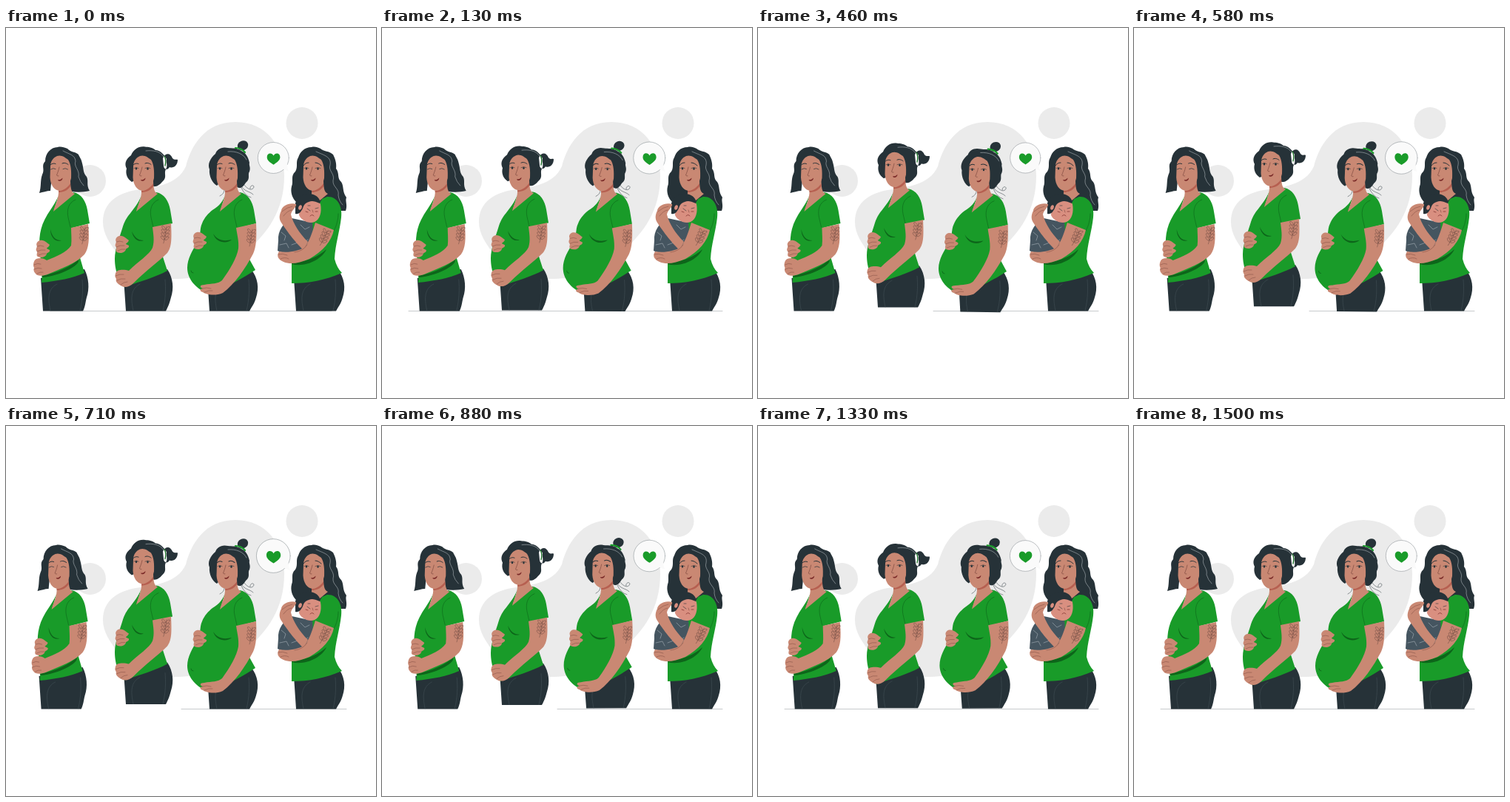
An HTML page with a canvas for the animation above (1.54 s loop, 500 by 500 pixels).

```html
<!DOCTYPE html>
<html lang="en">
<head>
<meta charset="utf-8">
<title>Four stages</title>
<style>
html, body { margin: 0; width: 100%; height: 100%; overflow: hidden; background: #fff; }
canvas { display: block; width: 100vw; height: 100vh; }
</style>
</head>
<body>
<canvas id="stage" width="500" height="500"></canvas>
<script>
const ctx = document.getElementById('stage').getContext('2d');
const LOOP = 1540;
const GREEN = '#199b29', SHADE = '#0d651a', DARK = '#263238', SKIN = '#c98873',
  BABY_SKIN = '#d98f80', LINE = '#7f4a40', LIP = '#7a2a28', GREY = '#ebebeb',
  SEAM = '#46545b', SHINE = '#c9cfd2', WRAP = '#455560';

function fill(color, d) {
  ctx.fillStyle = color;
  ctx.fill(new Path2D(d));
}
function line(color, width, d) {
  ctx.strokeStyle = color;
  ctx.lineWidth = width;
  ctx.stroke(new Path2D(d));
}
function oval(color, x, y, rx, ry = rx, turn = 0) {
  ctx.fillStyle = color;
  ctx.beginPath();
  ctx.ellipse(x, y, rx, ry, turn, 0, Math.PI * 2);
  ctx.fill();
}
function at(x, y, angle, draw) {
  ctx.save();
  ctx.translate(x, y);
  ctx.rotate(angle);
  draw();
  ctx.restore();
}

// Smooth curve through [time, value] keys, at rest at both ends.
function track(...keys) {
  const slope = i => {
    const a = keys[i - 1], b = keys[i + 1];
    return a && b ? (b[1] - a[1]) / (b[0] - a[0]) : 0;
  };
  return t => {
    let i = 0;
    while (i < keys.length - 2 && t > keys[i + 1][0]) i++;
    const [t0, v0] = keys[i], [t1, v1] = keys[i + 1];
    const d = t1 - t0, u = (t - t0) / d, w = 1 - u;
    return v0 * (1 + 2 * u) * w * w + v1 * u * u * (3 - 2 * u)
      + d * u * w * (slope(i) * w - slope(i + 1) * u);
  };
}
const sway = track([0, 0], [180, 1], [290, 0.9], [460, -1.5], [660, -2.5], [1080, -0.9], [1330, -0.3], [1500, 0], [1540, 0]);
const lift = track([0, 0], [290, -2.8], [460, -4.8], [680, -6.5], [1080, -3.6], [1330, -1.2], [1500, 0], [1540, 0]);
const tilt = track([0, 0], [290, 0.011], [460, 0.011], [710, 0], [1080, -0.013], [1330, -0.005], [1500, 0], [1540, 0]);
const beat = track([0, 1], [270, 1.05], [460, 0.98], [700, 1.09], [930, 1], [1540, 1]);

function tattoo(x, y, angle) {
  at(x, y, angle, () => {
    line('#6d4a42', 0.5, 'M-1 12C1 5 0 -4 1 -11');
    for (let i = 0; i < 4; i++) {
      for (const side of [-1, 1]) {
        ctx.beginPath();
        ctx.ellipse(side * 2.9, 5 - i * 4.6, 3.2, 1.5, side * -0.75, 0, Math.PI * 2);
        ctx.stroke();
      }
    }
  });
}

function pants(right) {
  fill(DARK, `M47 338L106 326C${right + 1} 338 ${right + 2} 352 ${right - 2} 364C${right - 4} 372 107 377 104 382.4L50 382.4Z`);
  line(SEAM, 0.5, 'M60 382C56 364 57 352 69 346M100 382C104 366 104 352 103 340');
}

function head({ closed = false, worried = false } = {}) {
  fill(SKIN, 'M70 210L87 203C87 216 88 222 93 224L64 248C66 239 72 230 71 218Z');
  fill('#b65f50', 'M71 219C79 219 84 215 87 210L87 214C83 220 77 222 71 222Z');
  fill(SKIN, 'M60 187C60 180 64 175 69 173C75 171 80 175 84 178C88 184 88.5 194 88 203C86 213 79 220 72 220C65 219 60 212 59.5 202Z');
  line(DARK, 1, worried
    ? 'M60 186C62 183 64 182 67 182M76 182C79 182 82 184 84 186'
    : 'M60 185C62 183 65 182.5 67 183.5M76 183C79 181.5 82 183 84 184.5');
  if (closed) {
    line(DARK, 0.7, 'M60.5 191Q64 188.5 67 190.5M77 190.5Q80 188.5 83.5 191');
  } else {
    oval(DARK, 64, 190, 1.2, 1.6);
    oval(DARK, 79.5, 190.2, 1.2, 1.6);
    line(DARK, 0.6, 'M61 189.5Q64 187.2 67 189.5M76 189.5Q79.5 187.2 83 189.5');
  }
  line(LINE, 0.7, 'M72 188C71 193 69.5 196 68.5 199Q70 200.5 71 200');
  fill(LIP, 'M70 205C73 205.5 74.5 204.5 76.5 202.5C76.5 205.5 74 207.5 71 206.5Z');
}

function shirt(front) {
  fill(GREEN, `M71 226L65 246L91 222C102 224 108 234 110 246L113 264L90 270L97 300${front}C64 240 68 234 71 226Z`);
  line(SHADE, 0.6, 'M94 232C84 236 82 246 84 256L87 269M65 246L84 230');
}

// Resting hand with the fingers pointing left.
function hand(x, y) {
  at(x, y, 0, () => {
    fill(SKIN, 'M5 0C11 -1 15 4 18 6C17 9 14 10 14 11L18 13C19 16 14 17 14 18C13 23 6 24 2 22C-1 20 2 16 1 15C-2 13 1 9 1 8C-1 5 1 1 5 0Z');
    line(LINE, 0.5, 'M1 8Q6 6 10 8M1 15Q6 12 12 13M3 20Q8 17 13 18');
  });
}

function firstWoman() {
  fill(DARK, 'M70 161C60 161 53 170 53 180C47 186 53 191 49 198C46 206 48 214 45 223C50 222 55 220 60 220L62 200L84 212L88 221C96 222 104 222 113 220C108 212 112 207 109 201C104 196 105 190 103 183C102 177 99 174 98 171C94 167 87 168 83 163C78 161 74 160 70 161Z');
  line(SHINE, 0.5, 'M77 166C86 171 93 171 94 180C91 187 100 192 98 201Q100 208 105 213');
  pants(111);
  shirt('L106 331C90 338 70 342 48 344C50 330 47 318 46 305C44 285 45 270 56 252');
  head({ closed: true });
  fill(SHADE, 'M60 272C62 281 66 287 75 287C68 290 60 284 60 272ZM48 335C70 331 89 321 98 313C101 321 72 335 50 337Z');
  hand(41, 287);
  fill(SKIN, 'M88 270L111 265C113 285 112 298 106 306C95 318 75 325 56 333C48 336 42 335 40 332C36 328 38 325 38 324C36 321 37 314 41 312C46 310 51 311 55 314C68 309 82 303 88 294C89 286 88 278 88 270Z');
  line(LINE, 0.5, 'M38 320Q43 317 47 319M38 326Q43 323 48 325M42 332Q46 329 50 330');
  tattoo(105, 280, 0.1);
}

function secondWoman() {
  fill(DARK, 'M100 176C104 168 110 169 113 176C116 179 118 177 120 178C120 186 114 190 109 188C106 193 101 191 101 186ZM76 160.5C68 159 60 164 57 172C49 178 48 184 51 190C49 197 52 204 58 208L64 205L86 214C94 215 97 210 100 207C106 202 101 196 104 191C107 186 104 182 105 177C101 170 96 165 90 165C86 161 80 161 76 160.5Z');
  line(SHINE, 0.5, 'M77 166C86 165 96 166 101 174');
  line(SHADE, 1.3, 'M102 173Q105 178 103 186');
  pants(113);
  shirt('L106 328C90 337 70 342 48 350C42 345 35 330 35 312C35 298 42 282 46 268C49 259 53 254 57 249');
  head();
  fill(SHADE, 'M58 275C62 283 66 287 74 287C67 290 60 285 58 275Z');
  hand(36, 281);
  fill(SKIN, 'M86 269L111 264C112 285 112 296 106 304C94 316 78 327 60 345C54 351 47 351 43 348C37 345 36 341 37 339C34 335 36 329 39 328C44 326 50 327 54 328C66 316 82 306 86 297C89 288 87 278 86 269Z');
  line(LINE, 0.5, 'M36 335Q42 332 47 333M38 341Q43 338 49 339M43 347Q47 343 52 343');
  tattoo(103, 279, 0.1);
}

function thirdWoman() {
  oval(DARK, 95, 158.8, 7.4, 6.4, -0.4);
  fill(DARK, 'M75 162C66 160 60 164 58 170C51 176 47 184 50 191C49 200 54 210 60 213L65 208L86 214C92 219 96 214 99 209C106 204 101 198 104 194C106 188 103 186 104 182C102 173 98 168 93 166C86 161 80 163 75 162Z');
  line(SHINE, 0.5, 'M75 167C86 166 96 170 100 178');
  line(GREEN, 2.2, 'M85 162Q93 162 98 168');
  line(DARK, 0.5, 'M92 212C97 222 104 220 109 225M96 211C102 219 108 220 110 215C110 211 104 213 105 217M93 216Q98 227 106 229M70 219Q70 224 64 227');
  pants(115);
  shirt('L112 327C95 338 70 353 46 358C30 351 20 338 20 324C20 312 27 300 33 291C39 282 36 272 40 264C43 256 49 250 54 246');
  head();
  fill(SHADE, 'M55 278C60 286 68 289 80 286C74 292 59 291 55 278Z');
  line(SHADE, 0.8, 'M25 328Q25 331 28 331');
  hand(28, 276);
  fill(SKIN, 'M86 270L113 264C114 285 113 296 109 305C98 326 84 346 68 358C59 362 46 361 41 357C37 356 36 353 41 352C36 350 37 347 43 347C53 345 62 346 67 341C78 326 87 310 89 298C90 288 87 278 86 270Z');
  line(LINE, 0.5, 'M40 352Q46 350 52 352M43 357Q49 354 54 355');
  tattoo(106, 283, 0.08);
}

function baby() {
  fill(WRAP, 'M386 257C375 263 367 274 368 287L367 301C376 306 396 303 405 298C414 291 416 276 414 263Z');
  line('#a8b3b9', 0.6, 'M372 276L378 281L376 287M382 270L388 276M370 293L379 291L382 297M389 282L396 279L400 284M386 293L394 290M398 266L404 272L410 269M401 291L408 286');
  fill(BABY_SKIN, 'M397 236C405 231 422 232 425 238C427 249 424 259 417 262C409 265 399 260 396 253Z');
  fill(DARK, 'M391 243C389 231 400 223 411 224C421 225 426 233 424 237C414 232 410 234 405 237C401 240 402 244 399 247C397 251 393 252 391 251Z');
  oval(BABY_SKIN, 397.5, 242.5, 2.2, 3.4, 0.3);
  line(DARK, 0.6, 'M407 244L411 247M418 244L422 243M408 240L411 240');
  line(LIP, 0.7, 'M405 248L408 249M418 248L421 248M411 254Q414 251 416 254');
  line(LINE, 0.6, 'M414 246L415 249');
}

function fourthWoman() {
  fill(DARK, 'M413 161C403 161 397 168 395 175C391 181 395 187 391 194C384 200 389 207 386 214C384 222 387 230 392 235L430 238L449 247L459 247C462 239 458 234 460 229C454 221 457 214 453 208C447 203 451 196 446 190C447 183 445 177 442 171C437 166 429 167 425 163C421 161 417 160 413 161Z');
  line(SHINE, 0.5, 'M419 167C430 172 440 174 438 185C435 193 445 197 442 206C441 215 451 217 449 226Q450 234 455 239');
  at(342, 0, 0, () => pants(115));
  fill(GREEN, 'M434 228C447 227 455 240 453 256C451 275 445 292 444 312Q447 324 454 331C430 341 410 345 386 345L386 305L416 250L427 231Z');
  at(342, 0, 0, () => head({ worried: true }));
  fill(GREEN, 'M432 229C445 227 452 240 449 254L443 274L417 263C422 250 424 237 432 229Z');
  line(SHADE, 0.6, 'M443 274C447 267 449 258 449 251');
  fill(SHADE, 'M386 316C400 318 422 310 433 299C427 313 404 324 386 319Z');
  baby();
  fill(SKIN, 'M372 247C372 241 383 235 392 238C393 242 386 246 385 252C388 264 396 277 408 289L402 300C391 290 377 271 372 263C368 257 370 251 372 247Z');
  line(LINE, 0.5, 'M373 248Q380 242 387 241M375 254Q380 247 386 246');
  fill(SKIN, 'M418 263L443 273C440 288 428 302 410 312C396 318 384 320 375 316C368 313 365 308 369 302C380 304 395 302 404 296C410 288 414 276 418 263Z');
  line(LINE, 0.5, 'M368 306Q374 304 380 307M371 312Q377 309 382 312M390 303Q401 302 407 293');
  tattoo(430, 283, 0.4);
}

function background() {
  fill(GREY, 'M310 127C352 127 376 160 376 200C376 247 353 277 327 300C300 325 265 339 232 339C195 339 170 330 155 310C140 292 131 278 131 262C131 240 145 226 170 220C198 215 231 214 243 187C250 160 268 127 310 127Z');
  oval(GREY, 400, 128.5, 21.5);
  oval(GREY, 113.5, 206.5, 21.5);
}

function ground(t) {
  const start = t < 40 ? 60 : t > 400 && t < 930 ? 237 : 36;
  const end = t < 40 ? 440 : 460;
  line('#b9bdbf', 0.8, `M${start} 382.5H${end}`);
}

function bubble(scale) {
  at(361.3, 175.5, 0, () => {
    ctx.scale(scale, scale);
    oval('#fafafa', 0, 0, 21);
    line('#7d858a', 0.5, 'M21 0A21 21 0 1 1 -21 0A21 21 0 1 1 21 0');
    fill('#fafafa', 'M13 15L18.6 8Q18.5 14 20.5 18Z');
    fill(GREEN, 'M0.3 9.2C-5 6 -8.6 3.2 -8.6 -1C-8.6 -7 -2 -7.6 0.3 -3C2.5 -7.6 9.1 -7 9.1 -1C9.1 3.2 5 6 0.3 9.2Z');
  });
}

function draw(now) {
  const t = now % LOOP;
  ctx.fillStyle = '#fff';
  ctx.fillRect(0, 0, 500, 500);
  background();
  ground(t);
  at(sway(t), 0, 0, firstWoman);
  at(112, lift(t), 0, secondWoman);
  at(165, 235, tilt(t), () => at(60, -235, 0, thirdWoman));
  fourthWoman();
  bubble(beat(t));
  requestAnimationFrame(draw);
}

ctx.lineCap = ctx.lineJoin = 'round';
draw(0);
</script>
</body>
</html>
```
